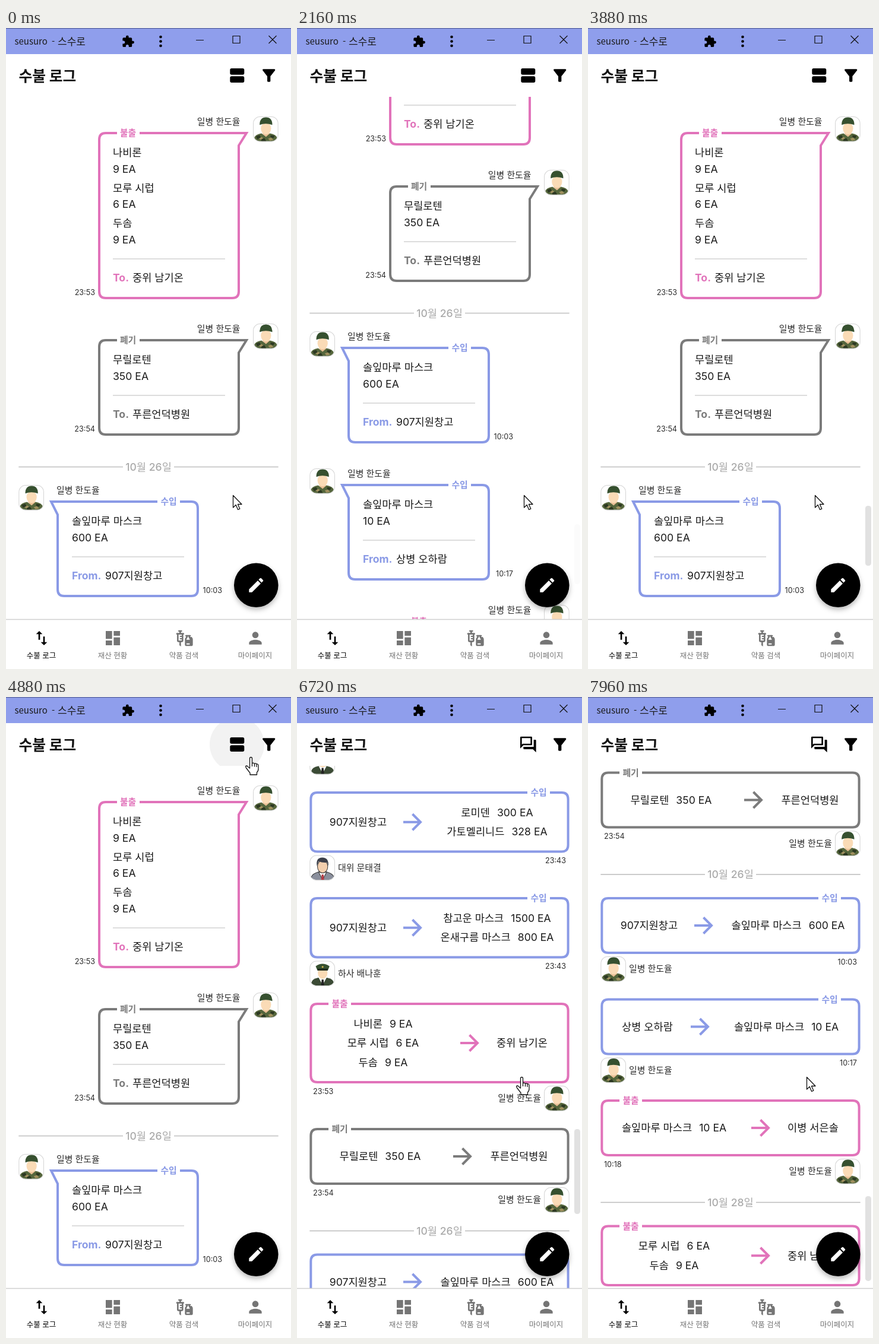
An HTML page that plays this animation: 480 by 1080 pixels, repeating every 8000 ms.

```html
<!DOCTYPE html>
<html lang="ko">
<head>
<meta charset="utf-8">
<title>수불 로그</title>
<style>
  html, body { margin: 0; width: 100%; height: 100%; overflow: hidden; background: #fff; }
  svg { display: block; width: 480px; height: 1080px; }
  text { font-family: Inter, "Noto Sans CJK KR", "Noto Sans CJK", "Noto Sans CJK JP", sans-serif; white-space: pre; }
  .bar text { font-family: "Noto Sans CJK KR", "Noto Sans CJK", "Noto Sans CJK JP", sans-serif; }
</style>
</head>
<body>
<svg viewBox="0 0 480 1080" xmlns="http://www.w3.org/2000/svg">
  <defs>
    <clipPath id="port"><rect y="116" width="480" height="880"/></clipPath>
    <clipPath id="head"><rect y="44" width="480" height="72"/></clipPath>
    <clipPath id="frame"><rect x="1" y="1" width="40" height="40" rx="10"/></clipPath>
    <filter id="shade" x="-30%" y="-30%" width="160%" height="170%">
      <feDropShadow dx="0" dy="4" stdDeviation="4" flood-opacity=".28"/>
    </filter>
    <g id="camo">
      <path d="M2 42V36Q3 30 14 28L21 33 28 28Q39 30 40 36V42z" fill="#55663c"/>
      <path d="M5 33l6-2 2 4-6 3zM29 31l7 1-2 4-5-1zM13 38l6-2 3 5h-8z" fill="#2c3822"/>
      <path d="M10 37l4-3 3 2-4 3zM25 37l5-2 4 4-6 1z" fill="#a1905f"/>
    </g>
    <g id="soldier">
      <use href="#camo"/>
      <path d="M16 24h11v5l-5.500 5-5.500-5z" fill="#e9be94"/>
      <ellipse cx="21.500" cy="20" rx="8.500" ry="10" fill="#fadbb6"/>
      <path d="M11 14Q11 1.500 21.500 1.500T32 14Q21 10 11 14z" fill="#36502f"/>
    </g>
    <g id="sergeant">
      <path d="M3 42V36Q4 30 14 28h15Q39 30 40 36V42z" fill="#3b4b35"/>
      <path d="M15 28l6.500 12L28 28z" fill="#fff"/>
      <path d="M20 31h3l1 10h-5z" fill="#222"/>
      <ellipse cx="21.500" cy="20" rx="8" ry="10" fill="#fadbb6"/>
      <path d="M10 9Q21 1 33 9L30 16H13z" fill="#36502f"/>
      <path d="M13 13h17v3H13z" fill="#1d271b"/>
      <circle cx="21.500" cy="10" r="1.500" fill="#d9b94f"/>
    </g>
    <g id="captain">
      <path d="M3 42V36Q4 31 14 28h15Q39 31 40 36V42z" fill="#8a8f9c" stroke="#333"/>
      <path d="M15 28l6.500 13L28 28z" fill="#fff" stroke="#333"/>
      <path d="M20 32h3l1 9h-5z" fill="#b33c45"/>
      <ellipse cx="21.500" cy="19" rx="8.500" ry="10.500" fill="#f3cfae" stroke="#333"/>
      <path d="M12 18Q10 4 21 4T31 18L29 12Q21 13 15 10z" fill="#3c3f4a"/>
    </g>
  </defs>
  <rect width="480" height="1080" fill="#fff"/>
  <g clip-path="url(#port)"><g id="chat"></g><g id="list"></g></g>
  <rect id="thumb" x="467" width="10" rx="4.500" fill="#e1e1e1"/>
  <circle cx="421.300" cy="938.700" r="37.300" filter="url(#shade)"/>
  <g id="chrome"></g>
  <g id="cursor" fill="#fff" stroke="#111" stroke-width="1.300" stroke-linejoin="round">
    <path id="arrow" d="M.5.5V21l4.700-4.500 3.400 8 3.200-1.400-3.400-7.600h6.600z"/>
    <path id="hand" d="M8.500 2.500Q8.500.5 10.500.5T12.500 2.500V11q2-2 4 .5 2-1.500 3.500.5 3-.5 3 2.500V20q0 4-2.500 6v4H9v-3L2.500 18.500q-2-3 .5-3.500 2 0 3.500 2.500l2 1.500zM12.500 11v5M16.500 12v4.500M20 12.500V17"/>
  </g>
</svg>
<script>
const $ = id => document.getElementById(id);
const COLOR = { in: '#8a9ae6', out: '#e173ba', drop: '#7b7b7b' };
const LABEL = { in: '수입', out: '불출', drop: '폐기' };
const ME = '일병 한도율', DEPOT = '907지원창고', CLINIC = '푸른언덕병원', CHIEF = '중위 남기온';
const PAL = '상병 오하람', ROOKIE = '이병 서은솔', MASK = '솔잎마루 마스크';
const COUGH = [['나비론', 9], ['모루 시럽', 6], ['두솜', 9]];

// Text centred vertically on y
const text = (x, y, s, { size = 17.6, weight = 400, fill = '#1a1a1a', anchor = 'start' } = {}) =>
  `<text x="${x}" y="${y + size * .365}" font-size="${size}" font-weight="${weight}" fill="${fill}" text-anchor="${anchor}">${s}</text>`;
const line = (d, color, w = 4) => `<path d="${d}" fill="none" stroke="${color}" stroke-width="${w}"/>`;
const icon = (d, x, y, k = 4 / 3, fill = '#000') =>
  `<path d="${d}" transform="translate(${x - 12 * k} ${y - 12 * k}) scale(${k})" fill="${fill}"/>`;
const avatar = (x, y, who = 'soldier') => `<g transform="translate(${x} ${y}) scale(1.016)">
  <g clip-path="url(#frame)"><use href="#${who}"/></g>
  <rect x=".5" y=".5" width="41" height="41" rx="11" fill="none" stroke="#d4d4d4"/></g>`;
const small = (x, y, s, anchor) => text(x, y, s, { size: 12.6, fill: '#2a2a2a', anchor });
const person = (x, y, s, anchor) => text(x, y, s, { size: 14.9, fill: '#2a2a2a', anchor });
const tag = (x, y, kind) => text(x, y, LABEL[kind], { size: 14.8, weight: 700, fill: COLOR[kind], anchor: 'middle' });
const date = (y, s, w, c) => line(`M21.300 ${y}H197M283 ${y}H458.700`, c, w) +
  text(240, y, s, { weight: 500, fill: '#aaa', anchor: 'middle' });

function bubble(y, kind, items, party, time) {
  const left = kind === 'in', color = COLOR[kind], x = left ? 111 : 180;
  const extra = 59.5 * (items.length - 1), bottom = y + 159 + extra;
  const outline = left
    ? `M293 ${y}H312q11 0 11 11V${bottom - 11}q0 11-11 11H98q-11 0-11-11V${y + 22}L76 ${y}H255`
    : `M187 ${y}H168q-11 0-11 11V${bottom - 11}q0 11 11 11H381q11 0 11-11V${y + 21}L405 ${y}H225`;
  return line(outline, color) + tag(left ? 274 : 205.5, y, kind) +
    avatar(left ? 21.3 : 416, y - 28) +
    person(left ? 85 : 394.5, y - 19, ME, left ? 'start' : 'end') +
    items.map(([name, n], i) =>
      text(x, y + 33 + 59.5 * i, name) + text(x, y + 60.5 + 59.5 * i, n + ' EA')).join('') +
    line(`M${x} ${y + 93 + extra}h189`, '#d2d2d2', 1.3) +
    text(x, y + 125 + extra, left ? 'From.' : 'To.', { weight: 700, fill: color }) +
    text(x + (left ? 56 : 33), y + 125 + extra, party) +
    small(left ? 364 : 150, y + 149 + extra, time, 'end');
}

const cards = [];
function card(y, kind, items, party, time, who = ME, face = 'soldier') {
  const left = kind === 'in', color = COLOR[kind], n = items.length;
  const h = n === 1 ? 92 : 34.5 + 32.5 * n, mid = y + h / 2, end = y + h;
  const [px, ax, ix] = party === DEPOT ? [103, 195, 337] : party === PAL ? [100, 189, 334]
    : party === CLINIC ? [374, 279, 140] : [379, 291, 145];
  const [g0, g1] = left ? [388, 426] : [53, 91];
  cards.push([y, end]);
  return line(`M${g1} ${y}H445.600q11 0 11 11V${end - 11}q0 11-11 11H34.300q-11 0-11-11V${y + 11}q0-11 11-11H${g0}`, color) +
    tag((g0 + g1) / 2, y, kind) +
    text(px, mid, party, { anchor: 'middle' }) +
    line(`M${ax - 16} ${mid}h29m-13.500-13.500l13.500 13.500-13.500 13.500`, color) +
    items.map(([name, q], i) =>
      text(ix, mid + 32.5 * (i - (n - 1) / 2), `${name}<tspan dx="12">${q} EA</tspan>`, { anchor: 'middle' })).join('') +
    small(left ? 453 : 27, end + 15, time, left ? 'end' : 'start') +
    avatar(left ? 21.3 : 416, end + 6, face) +
    person(left ? 69 : 411, end + 27, who, left ? 'start' : 'end');
}

$('chat').innerHTML =
  bubble(177, 'out', COUGH, CHIEF, '23:53') +
  bubble(526, 'drop', [['무릴로텐', 350]], CLINIC, '23:54') +
  date(739.5, '10월 26일', 2, '#cdcdcd') +
  bubble(798, 'in', [[MASK, 600]], DEPOT, '10:03') +
  bubble(1029, 'in', [[MASK, 10]], PAL, '10:17') +
  bubble(1259, 'out', [[MASK, 10]], ROOKIE, '10:18');

const NCO = '하사 배나훈';
$('list').innerHTML =
  card(-10, 'in', [[MASK, 200]], DEPOT, '23:42', NCO, 'sergeant') +
  card(161, 'in', [['로미덴', 300], ['가토멜리니드', 328]], DEPOT, '23:43', '대위 문태결', 'captain') +
  card(339, 'in', [['참고운 마스크', 1500], ['온새구름 마스크', 800]], DEPOT, '23:43', NCO, 'sergeant') +
  card(517, 'out', COUGH, CHIEF, '23:53') +
  card(728, 'drop', [['무릴로텐', 350]], CLINIC, '23:54') +
  date(899.5, '10월 26일', 1.5, '#bbb') +
  card(939.5, 'in', [[MASK, 600]], DEPOT, '10:03') +
  card(1110, 'in', [[MASK, 10]], PAL, '10:17') +
  card(1280.5, 'out', [[MASK, 10]], ROOKIE, '10:18') +
  date(1452, '10월 28일', 1.5, '#bbb') +
  card(1492, 'out', COUGH.slice(1), CHIEF, '10:21');

const PATH = {
  puzzle: 'M20.5 11H19V7c0-1.100-.9-2-2-2h-4V3.500a2.500 2.500 0 0 0-5 0V5H4a2 2 0 0 0-2 2v3.800h1.500a2.700 2.700 0 0 1 0 5.400H2V20a2 2 0 0 0 2 2h3.800v-1.500a2.700 2.700 0 0 1 5.400 0V22H17a2 2 0 0 0 2-2v-4h1.500a2.500 2.500 0 0 0 0-5z',
  agenda: 'M5 3h14q2 0 2 2v4q0 2-2 2H5q-2 0-2-2V5q0-2 2-2zm0 10h14q2 0 2 2v4q0 2-2 2H5q-2 0-2-2v-4q0-2 2-2z',
  forum: 'M15 4v7H5.200L4 12.200V4h11m1-2H3a1 1 0 0 0-1 1v14l4-4h10a1 1 0 0 0 1-1V3a1 1 0 0 0-1-1zm5 4h-2v9H6v2a1 1 0 0 0 1 1h11l4 4V7a1 1 0 0 0-1-1z',
  filter: 'M4.250 5.600C6.300 8.200 10 13 10 13v6a1 1 0 0 0 1 1h2a1 1 0 0 0 1-1v-6s3.700-4.800 5.750-7.400A1 1 0 0 0 19 4H5a1 1 0 0 0-.75 1.600z',
  swap: 'M16 17v-7h-2v7h-3l4 4 4-4zM9 3L5 7h3v7h2V7h3z',
  board: 'M3 13h8V3H3zm0 8h8v-6H3zm10 0h8V11h-8zm0-18v6h8V3z',
  drug: 'M11 5.500H8V4h.5a1 1 0 0 0 0-2h-3a1 1 0 0 0 0 2H6v1.500H3a1 1 0 0 0 0 2V15a2 2 0 0 0 2 2h1v4l2 1.500V17h1a2 2 0 0 0 2-2V7.500a1 1 0 0 0 0-2zM9 9H7.250a.75.75 0 0 0 0 1.500H9V12H7.250a.75.75 0 0 0 0 1.500H9V15H5V7.500h4zm10.500 1.500V10a1 1 0 0 0 0-2h-5a1 1 0 0 0 0 2v.5c0 .5-1.500 1.200-1.500 3V20a2 2 0 0 0 2 2h6a2 2 0 0 0 2-2v-6.500c0-1.800-1.500-2.500-1.500-3zm-3 0V10h1v.5c0 1.600 1.500 2 1.500 3v.5h-4v-.5c0-1 1.500-1.400 1.500-3zM19 20h-4v-1.500h4z',
  user: 'M12 12a4 4 0 1 0 0-8 4 4 0 0 0 0 8zm0 2c-2.700 0-8 1.300-8 4v2h16v-2c0-2.700-5.300-4-8-4z',
  pen: 'M3 17.250V21h3.750L17.800 9.950 14.050 6.200zM20.700 7.050a1 1 0 0 0 0-1.400l-2.350-2.350a1 1 0 0 0-1.400 0l-1.850 1.800 3.750 3.750z'
};
const nav = [['수불 로그', 'swap'], ['재산 현황', 'board'], ['약품 검색', 'drug'], ['마이페이지', 'user']];

$('chrome').innerHTML =
  `<g class="bar"><rect width="480" height="44" fill="#8f9eec"/><rect width="480" height="1.200" fill="#59639c"/>` +
  text(14.5, 23, 'seusuro', { size: 15 }) + text(77, 23, '-', { size: 15 }) + text(87, 23, '스수로', { size: 17 }) + '</g>' +
  icon(PATH.puzzle, 205.7, 22.7, .93) +
  [15, 22.5, 30].map(y => `<circle cx="260.500" cy="${y}" r="2.300"/>`).join('') +
  line('M320 20.500h13M382 13.500h12v12h-12zM442.500 13l13 13m0-13l-13 13', '#111', 1.2) +
  '<g clip-path="url(#head)"><circle id="hover" cx="389" cy="80" r="46" fill="#f2f2f2"/></g>' +
  text(21.5, 80.5, '수불 로그', { size: 24.7, weight: 700, fill: '#111' }) +
  `<g id="toList">${icon(PATH.agenda, 389.3, 80)}</g>` +
  `<g id="toChat">${icon(PATH.forum, 389.3, 80)}</g>` +
  icon(PATH.filter, 442.7, 80) +
  icon(PATH.pen, 421.3, 938.7, 4 / 3, '#fff') +
  '<rect y="996" width="480" height="84" fill="#fff"/>' + line('M0 996.500H480', '#cfcfcf', 1.3) +
  nav.map(([s, key], i) => {
    const x = 60 + 120 * i, fill = i ? '#757575' : '#000';
    return icon(PATH[key], x, 1028, 4 / 3, fill) +
      text(x - .5, 1057, s, { size: 12.5, fill, anchor: 'middle' });
  }).join('');

// Eased value of a track of [time, value] stops
function at(track, t) {
  const i = track.findIndex(p => p[0] > t);
  if (i === 0) return track[0][1];
  if (i < 0) return track[track.length - 1][1];
  const [t0, a] = track[i - 1], [t1, b] = track[i], u = (t - t0) / (t1 - t0);
  return a + (b - a) * u * u * (3 - 2 * u);
}

const SWITCH = 5160;
const chatY = [[1850, 0], [2140, 259], [2700, 259], [2890, 388], [3300, 388], [3720, 0]];
const listY = [[6120, 676], [6690, 0], [7430, 0], [7950, 600.5]];
const curX = [[4150, 382], [4650, 402], [5350, 402], [5900, 368]];
const curY = [[4150, 787], [4650, 101], [5350, 101], [5900, 640]];
const glow = [[4600, 0], [4780, 1], [5380, 1], [5520, 0]];
const fade = [[2100, 0], [2360, 1], [4100, 1], [4600, 0], [6400, 0], [6650, 1]];

const show = (id, on) => $(id).setAttribute('visibility', on ? 'visible' : 'hidden');
const move = (id, x, y) => $(id).setAttribute('transform', `translate(${x} ${y})`);

function draw() {
  const t = performance.now() % 8000, list = t >= SWITCH;
  const c = at(chatY, t), l = at(listY, t), x = at(curX, t), y = at(curY, t);
  move('chat', 0, -c);
  move('list', 0, -l);
  move('cursor', x, y);
  show('chat', !list);
  show('toList', !list);
  show('list', list);
  show('toChat', list);
  const onIcon = Math.hypot(x - 389, y - 80) < 46;
  const onCard = list && y > 116 && cards.some(([a, b]) => y + l > a && y + l < b);
  show('hand', onIcon || onCard);
  show('arrow', !onIcon && !onCard);
  $('hover').setAttribute('opacity', at(glow, t));
  const thumb = $('thumb');
  thumb.setAttribute('y', list ? 728 + .188 * l : 805 + .12 * c);
  thumb.setAttribute('height', list ? 143 : 101);
  thumb.setAttribute('opacity', at(fade, t));
  requestAnimationFrame(draw);
}
draw();
</script>
</body>
</html>
```
